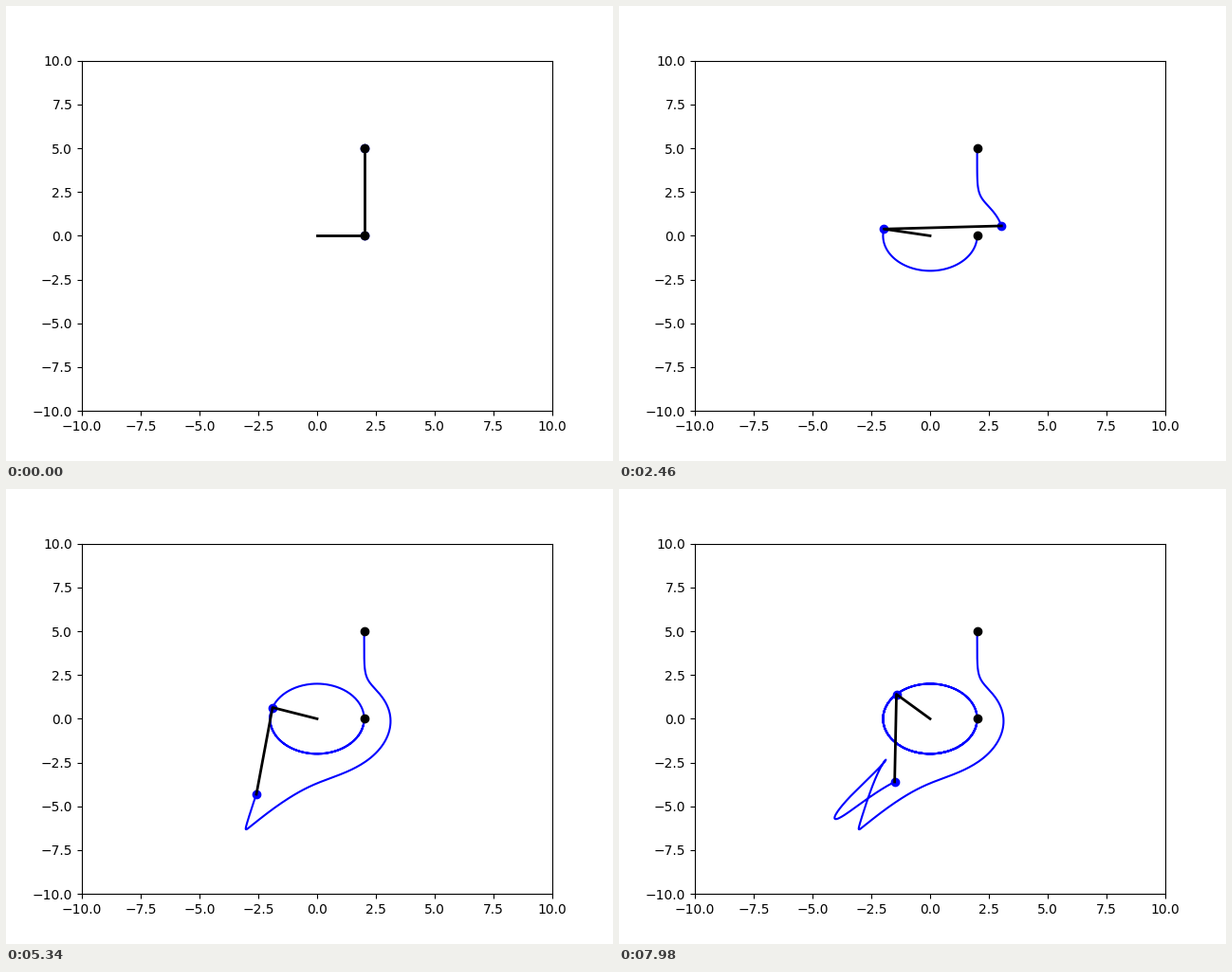
A matplotlib script for the animation above (8000 ms loop, 640x480 px).

```python
import numpy as np
import matplotlib.pyplot as plt
from matplotlib.animation import FuncAnimation

G = 9.81
L1, L2 = 2.0, 5.0
M1, M2 = 1.0, 1.0
FRAMES, INTERVAL = 400, 20
DT = 0.01
SUBSTEPS = 4


def deriv(s):
    """Double pendulum; angles are measured from straight down."""
    a, wa, b, wb = s
    d = b - a
    sd, cd = np.sin(d), np.cos(d)
    m = M1 + M2
    den = m - M2 * cd * cd
    acc_a = (M2 * L1 * wa**2 * sd * cd + M2 * G * np.sin(b) * cd
             + M2 * L2 * wb**2 * sd - m * G * np.sin(a)) / (L1 * den)
    acc_b = (-M2 * L2 * wb**2 * sd * cd + m * G * np.sin(a) * cd
             - m * L1 * wa**2 * sd - m * G * np.sin(b)) / (L2 * den)
    return np.array([wa, acc_a, wb, acc_b])


def rk4(s, h):
    k1 = deriv(s)
    k2 = deriv(s + h / 2 * k1)
    k3 = deriv(s + h / 2 * k2)
    k4 = deriv(s + h * k3)
    return s + h / 6 * (k1 + 2 * k2 + 2 * k3 + k4)


def simulate():
    states = [np.array([np.pi / 2, 0, np.pi, 0])]
    for _ in range(FRAMES - 1):
        s = states[-1]
        for _ in range(SUBSTEPS):
            s = rk4(s, DT / SUBSTEPS)
        states.append(s)
    return np.array(states)


states = simulate()
a, b = states[:, 0], states[:, 2]
x1, y1 = L1 * np.sin(a), -L1 * np.cos(a)
x2, y2 = x1 + L2 * np.sin(b), y1 - L2 * np.cos(b)

fig, ax = plt.subplots(figsize=(6.4, 4.8), dpi=100)
ax.set_xlim(-10, 10)
ax.set_ylim(-10, 10)

trail1, = ax.plot([], [], "b-", lw=1.5)
trail2, = ax.plot([], [], "b-", lw=1.5)
bobs, = ax.plot([], [], "bo")
rods, = ax.plot([], [], "k-", lw=2)
ax.plot([x1[0], x2[0]], [y1[0], y2[0]], "ko")


def update(i):
    trail1.set_data(x1[:i + 1], y1[:i + 1])
    trail2.set_data(x2[:i + 1], y2[:i + 1])
    bobs.set_data([x1[i], x2[i]], [y1[i], y2[i]])
    rods.set_data([0, x1[i], x2[i]], [0, y1[i], y2[i]])
    return trail1, trail2, bobs, rods


anim = FuncAnimation(fig, update, frames=FRAMES, interval=INTERVAL,
                     repeat=True, repeat_delay=0)
plt.show()
```
